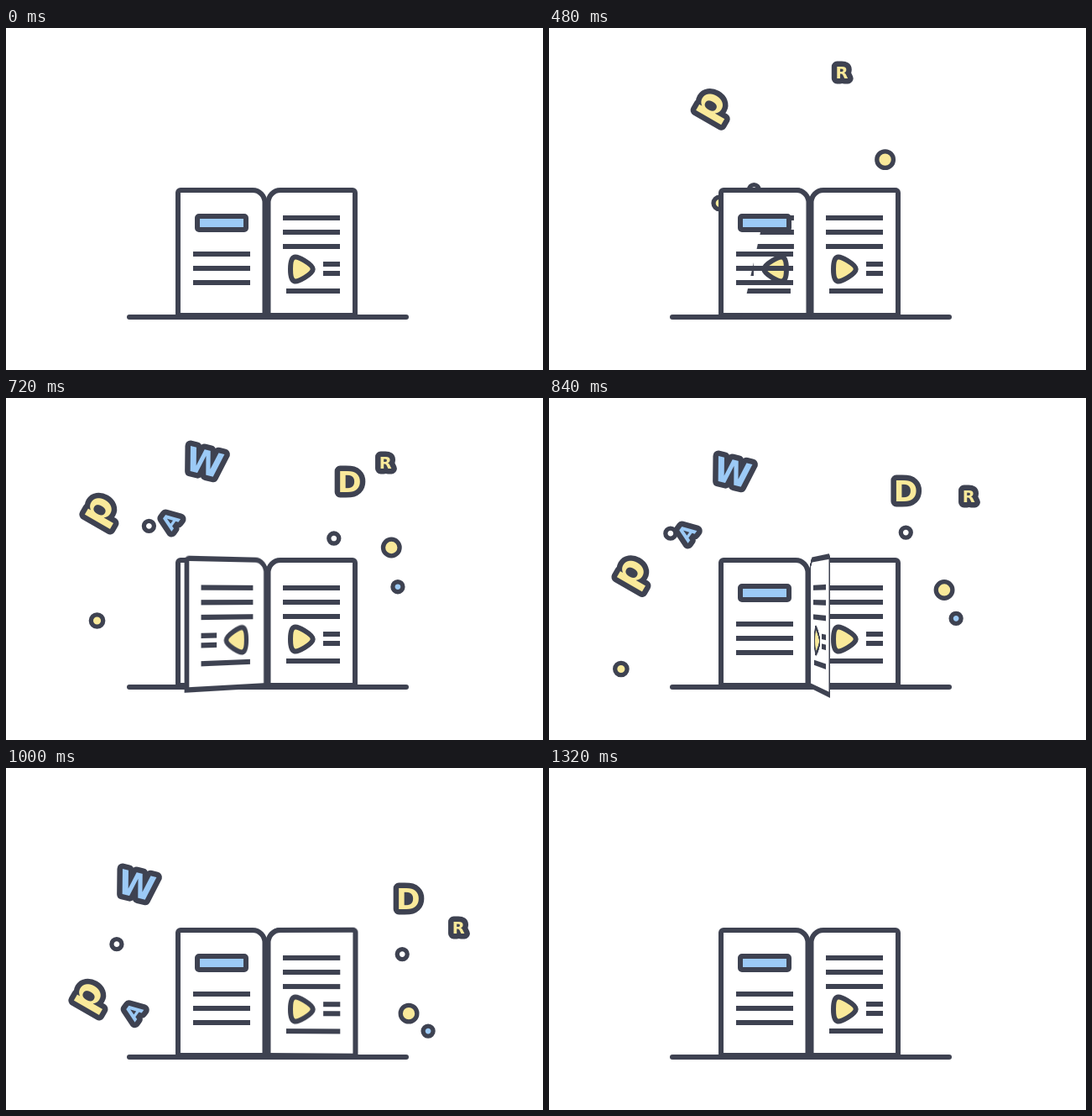
These frames come from a looping animation (640x407 px, 1360 ms). An HTML page:

```html
<!DOCTYPE html>
<html lang="en">
<head>
<meta charset="utf-8">
<title>Open book</title>
<style>
  html, body { margin: 0; width: 100%; height: 100%; overflow: hidden; background: #fff; }
  #stage, svg, #flip { position: absolute; left: 0; top: 0; width: 100%; height: 100%; overflow: hidden; }
  #stage { contain: strict; }
  svg { fill: none; stroke: #3e4251; stroke-width: 6; }
  #flip { perspective: 1070px; perspective-origin: 311px 236px; }
  #leaf { transform-origin: 311px 0; }
  #lead { z-index: 1; }
  .white { fill: #fff; }
  .yellow { fill: #f9e99a; }
  .blue { fill: #9ccaf6; }
  text { font-family: "DejaVu Sans", Verdana, sans-serif; font-weight: bold; text-anchor: middle;
         paint-order: stroke; stroke-width: 13; stroke-linejoin: round; }
  circle { stroke-width: 5.3; }
</style>
</head>
<body>
<div id="stage">
  <svg id="back">
    <defs>
      <g id="page">
        <path class="white" d="M312.5 342V208A14.5 15 0 0 1 327 193H413a3 3 0 0 1 3 3V342Z"/>
        <path d="M330 226h68M330 243h68M330 260h68M378 281h20M378 292h20M334 313h64"/>
        <path class="yellow" d="M339 287C339 268 346 271 356 277C369 285 369 289 356 297C346 303 339 306 339 287Z"/>
      </g>
    </defs>
    <g id="bits"></g>
    <path class="white" d="M308.5 342V208A14.5 15 0 0 0 294 193H208a3 3 0 0 0-3 3V342Z"/>
    <use href="#page"/>
    <path d="M147 344H477" stroke-linecap="round"/>
  </svg>
  <div id="flip"><svg id="leaf"><use href="#page"/></svg></div>
  <svg id="lead">
    <rect class="blue" x="228" y="224" width="58" height="16" rx="2"/>
    <path d="M223 269h68M223 286h68M223 303h68"/>
  </svg>
</div>
<script>
const LOOP = 1360, PASS = [640, 840, 1000], SPINE = 311, FLOOR = 320;
const $ = id => document.getElementById(id);
const clamp = v => Math.min(1, Math.max(0, v));
const bits = [];

// A bit leaves the book at `launch`, flies through three points and is gone at `end`.
function addBit(shape, color, points, { launch = 340, end = 1250 } = {}) {
  const el = document.createElementNS('http://www.w3.org/2000/svg', 'g');
  el.setAttribute('class', color);
  el.innerHTML = shape;
  $('bits').append(el);
  const home = [SPINE + 20 * Math.sign(points[0][0] - SPINE), 245];
  bits.push({ el, end, times: [launch, ...PASS], points: [home, ...points] });
}
const ring = (r, ...rest) => addBit(`<circle r="${r}"/>`, ...rest);
const letter = (char, size, turn, ...rest) => {
  const middle = char === 'p' ? 0.175 : 0.365;
  addBit(`<text font-size="${size}" y="${size * middle}" transform="rotate(${turn})">${char}</text>`, ...rest);
};

ring(6, 'white', [[193, 158], [145, 161], [132, 209]]);
ring(6, 'white', [[370, 186], [425, 160], [472, 221]]);
ring(7.2, 'yellow', [[133, 234], [86, 322], [80, 400]], { end: 960 });
ring(9.8, 'yellow', [[446, 154], [471, 228], [480, 292]]);
ring(6, 'blue', [[450, 206], [485, 262], [503, 313]]);
letter('p', 46, -60, 'yellow', [[133, 96], [102, 210], [102, 274]], { end: 1130 });
letter('W', 40, 14, 'blue', [[246, 95], [219, 88], [156, 138]], { launch: 470 });
letter('A', 24, -54, 'blue', [[222, 162], [164, 160], [152, 290]]);
letter('D', 34.5, 0, 'yellow', [[397, 115], [425, 110], [479, 154]], { launch: 470 });
letter('R', 19.5, 0, 'yellow', [[416, 59], [500, 116], [539, 189]], { launch: 100, end: 1130 });

// Cubic through the four timed values.
const curve = (times, values, t) => values.reduce((sum, value, i) =>
  sum + times.reduce((w, time, j) => i === j ? w : w * (t - time) / (times[i] - time), value), 0);

function position({ times, points }, t) {
  const flight = Math.min(Math.max(t, times[0]), times[3]);
  const [x, y] = [0, 1].map(axis => curve(times, points.map(p => p[axis]), flight));
  const settle = 1 - (1 - clamp((t - times[3]) / 160)) ** 2;
  const drift = 0.4 * (points[3][0] - points[2][0]);
  return [x + drift * settle, y + (FLOOR - y) / 2 * settle];
}

function draw(t) {
  for (const bit of bits) {
    const [x, y] = position(bit, t);
    bit.el.setAttribute('transform', `translate(${x} ${y}) scale(${clamp((bit.end - t) / 110)})`);
  }
  // The leaf surfaces on the left along a slanted edge, then swings over the front.
  const swing = clamp((t - 603) / 440);
  const edge = 355 + 2 * (t - 480);
  $('flip').style.display = t >= 460 && swing < 1 ? '' : 'none';
  $('flip').style.zIndex = t < 510 ? 0 : 2;
  $('leaf').style.clipPath = `polygon(300px 185px, ${edge}px 185px, ${edge + 36}px 346px, 300px 346px)`;
  $('leaf').style.transform = `rotateY(${270 - 90 * Math.cos(Math.PI * swing)}deg)`;
}

const start = performance.now();
function tick() {
  draw((performance.now() - start) % LOOP);
  requestAnimationFrame(tick);
}
tick();
</script>
</body>
</html>
```
